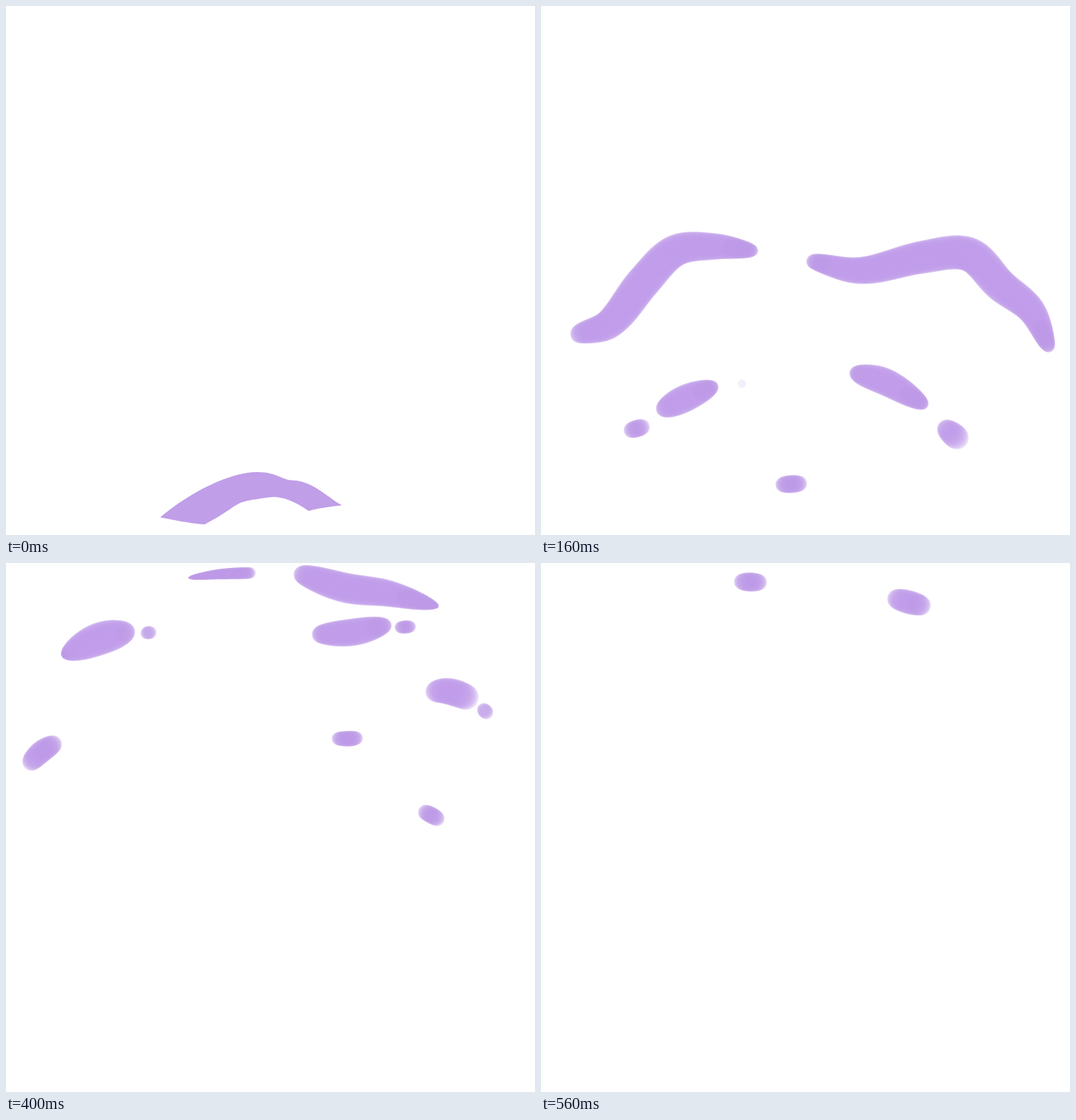
Write an HTML page with a canvas that moves like this. It is 748x748 px and loops after 640 ms.

```html
<!DOCTYPE html>
<html lang="en">
<head>
<meta charset="utf-8">
<title>Rising splash</title>
<style>
  html, body { margin: 0; width: 100%; height: 100%; overflow: hidden; background: #fff; }
  canvas { display: block; width: 100vw; height: 100vh; }
</style>
</head>
<body>
<canvas id="stage" width="748" height="748"></canvas>
<script>
const SIZE = 748, STEP = 80, STEPS = 8;
const INK = 'rgb(192, 158, 232)';
const DAB = 'rgba(190, 156, 230, 0.17)';
const ctx = document.getElementById('stage').getContext('2d');
const mix = (a, b, t) => a + (b - a) * t;

// A brush stroke that appears at a step, then dries up toward `keep` (0..1 along its path).
// `peak` is where it is widest, `tips` the relative widths of its two ends.
const strokes = [];
function stroke(born, radius, points, { peak = 0.5, tips = [0.5, 0.5], keep = 0.5, life = 1 } = {}) {
  strokes.push({ born, radius, at: spline(points), peak, tips, keep, life });
}
const round = { tips: [0.8, 0.8] };

// First rise
stroke(1, 23, [[90, 632], [140, 583], [205, 545], [290, 533]], { tips: [0.5, 0.3] });
stroke(1, 23, [[422, 512], [480, 525], [545, 560], [638, 645]], { tips: [0.4, 0.5] });
stroke(1, 15, [[322, 678], [386, 674]], { life: 2 });

// Wide wings
stroke(2, 24, [[53, 464], [97, 449], [145, 390], [190, 346], [245, 340], [300, 346]], { peak: 0.4, tips: [0.45, 0.25] });
stroke(2, 24, [[384, 361], [452, 374], [540, 355], [605, 351], [650, 395], [693, 430], [718, 482]], { peak: 0.6, tips: [0.35, 0.28] });
stroke(2, 19, [[173, 570], [208, 553], [244, 538]], { peak: 0.4, tips: [0.45, 0.25], keep: 0.45, life: 3 });
stroke(2, 19, [[445, 519], [488, 532], [541, 563]], { peak: 0.4, tips: [0.38, 0.28], keep: 0.75, life: 2 });
stroke(2, 12, [[127, 600], [144, 595]], round);
stroke(2, 17, [[572, 597], [589, 611]], { peak: 0.8, tips: [0.6, 0.9] });
stroke(2, 5.5, [[284, 534]], round);

// Higher wings
stroke(3, 23, [[39, 292], [65, 247], [130, 233], [205, 193], [265, 212], [311, 214]], { peak: 0.6, tips: [0.25, 0.3] });
stroke(3, 24, [[421, 238], [475, 245], [560, 211], [648, 191], [688, 235], [712, 285], [742, 368]], { peak: 0.65, tips: [0.35, 0.22] });
stroke(3, 17, [[514, 358], [575, 347], [631, 373]], { tips: [0.5, 0.35], keep: 0.78, life: 3 });
stroke(3, 16, [[192, 349], [266, 340]], { peak: 0.75, tips: [0.45, 0.9], keep: 0.25, life: 2 });
stroke(3, 13, [[657, 409], [674, 422]], round);

// Upper crest
stroke(4, 23, [[76, 140], [125, 100], [180, 87], [232, 87], [264, 92]], { peak: 0.6, tips: [0, 0.28] });
stroke(4, 22, [[400, 99], [437, 103], [557, 78], [610, 86], [654, 120]], { peak: 0.65, tips: [0.45, 0] });
stroke(4, 23, [[571, 192], [622, 181], [683, 204]], { peak: 0.65, tips: [0.4, 0.8], keep: 0.52, life: 3 });
stroke(4, 19, [[16, 305], [50, 267], [95, 242]], { tips: [0.55, 0.4], life: 2 });
stroke(4, 13, [[453, 248], [492, 248], [520, 242]], { peak: 0.6, tips: [0.6, 0.5], keep: 0.4, life: 2 });

// Top edge
stroke(5, 8, [[258, 21], [300, 16], [346, 14]], { peak: 0.9, tips: [0, 0.9] });
stroke(5, 21, [[418, 16], [480, 35], [540, 43], [610, 61]], { peak: 0.35, tips: [0.5, 0] });
stroke(5, 23, [[82, 130], [130, 108], [171, 97]], { peak: 0.6, tips: [0, 0.4], life: 2 });
stroke(5, 19, [[443, 101], [490, 98], [537, 88]], { tips: [0.5, 0.35], keep: 0.6, life: 2 });
stroke(5, 9, [[198, 99], [205, 98]], round);
stroke(5, 9, [[557, 91], [572, 90]], round);
stroke(5, 10, [[675, 207], [680, 212]], round);

// Last drops
stroke(6, 16, [[268, 26], [332, 28]], { keep: 0.4, life: 2 });
stroke(6, 20, [[470, 42], [560, 66]], { keep: 0.6, life: 2 });

// Smooth curve through the points; returns at(u) for u in 0..1 and its length
function spline(points) {
  const knots = [0];
  for (let i = 1; i < points.length; i++) {
    const [x0, y0] = points[i - 1], [x1, y1] = points[i];
    knots.push(knots[i - 1] + Math.hypot(x1 - x0, y1 - y0));
  }
  const last = points.length - 1, length = knots[last];
  const slope = (i, axis) => {
    const a = Math.max(i - 1, 0), b = Math.min(i + 1, last);
    return (points[b][axis] - points[a][axis]) / (knots[b] - knots[a]);
  };
  const at = u => {
    if (!last) return points[0];
    const s = u * length;
    let i = 0;
    while (i < last - 1 && s > knots[i + 1]) i++;
    const span = knots[i + 1] - knots[i], t = (s - knots[i]) / span;
    return [0, 1].map(axis => {
      const p = points[i][axis], q = points[i + 1][axis];
      const ease = t * t * (3 - 2 * t);
      return mix(p, q, ease) + span * t * (1 - t) * (slope(i, axis) * (1 - t) - slope(i + 1, axis) * t);
    });
  };
  at.length_ = length;
  return at;
}

// Overlapping translucent dabs: solid in the body, thin at the ends
function paint({ radius, at, peak, tips, keep }, age) {
  const left = 0.4 ** age;
  const from = keep * (1 - left), to = mix(keep, 1, left);
  const length = at.length_ * left;
  ctx.fillStyle = DAB;
  for (let s = 0; s <= length;) {
    const u = length ? s / length : 0.5;
    const rising = u < peak;
    const swell = Math.sqrt(Math.sin(Math.PI / 2 * (rising ? u / peak : (1 - u) / (1 - peak))));
    const tip = mix(1, tips[rising ? 0 : 1], 0.5 ** age);
    const r = radius * 0.82 ** age * mix(tip, 1, swell || 0) + 0.4;
    const [x, y] = at(mix(from, to, u));
    ctx.beginPath();
    ctx.arc(x, y, r, 0, 2 * Math.PI);
    ctx.fill();
    s += Math.max(0.3, r * 0.08);
  }
}

const ripple = new Path2D(`M218 723 C262 686 318 659 355 659 C385 659 388 671 410 671
  C436 674 455 695 475 706 Q440 710 428 714 C404 697 385 692 370 695
  C340 700 335 698 316 712 Q300 723 281 733 Q262 732 218 723Z`);

function draw(step) {
  ctx.fillStyle = '#fff';
  ctx.fillRect(0, 0, SIZE, SIZE);
  if (step === 0) {
    ctx.fillStyle = INK;
    ctx.fill(ripple);
  }
  for (const item of strokes) {
    const age = step - item.born;
    if (age >= 0 && age < item.life) paint(item, age);
  }
}

const start = performance.now();
function tick() {
  const elapsed = Math.max(0, performance.now() - start);
  draw(Math.floor(elapsed / STEP) % STEPS);
  requestAnimationFrame(tick);
}
tick();
</script>
</body>
</html>
```
